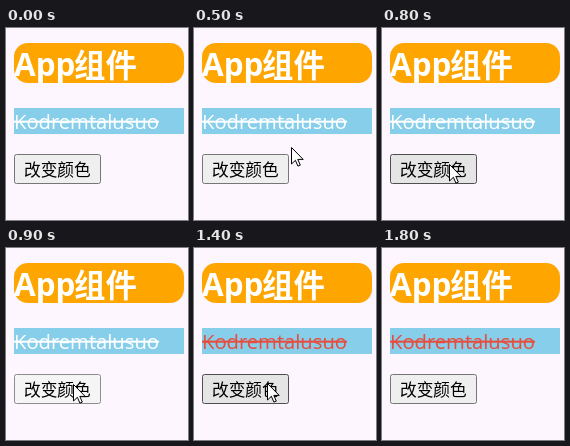
Write an HTML page that moves like this. It is 182 by 192 pixels and loops after 2.2 s.

```html
<!DOCTYPE html>
<html lang="zh-CN">
<head>
<meta charset="utf-8">
<style>
  html, body { margin: 0; width: 100%; height: 100%; overflow: hidden; background: #fdf6ff; }
  svg { display: block; width: 182px; height: 192px; }
  text { font-family: "Open Sans", "Noto Sans CJK SC", "Noto Sans CJK", sans-serif; }
  .title { font-size: 31.4px; font-weight: 700; fill: #fff; }
  .cjk { font-family: "Noto Sans CJK SC", "Noto Sans CJK", sans-serif; }
  #name { font-size: 20.2px; text-decoration: line-through; }
  .label { font-size: 16.7px; }
</style>
</head>
<body>
<svg viewBox="0 0 182 192">
  <rect x="8" y="15" width="170" height="40" rx="14" fill="#ffa500"/>
  <text class="title" x="8" y="48">App</text>
  <text class="title cjk" x="68" y="49">组件</text>
  <rect x="8" y="80" width="170" height="26" fill="#87ceeb"/>
  <text id="name" x="8" y="101">Kodremtalusuo</text>
  <rect id="button" x="8.5" y="126.5" width="86" height="29" rx="2"/>
  <text class="label cjk" x="18" y="148">改变颜色</text>
  <path id="arrow" d="M0 0V16.5L3.9 12.8 6.4 18.6 8.8 17.6 6.3 11.9H11.7Z" fill="#fff" stroke="#000"/>
  <path id="beam" d="M-3 -7.5H-1L0 -6.5 1 -7.5H3M0 -6.5V6.5M-3 7.5H-1L0 6.5 1 7.5H3" fill="none" stroke="#000"/>
</svg>
<script>
  const LOOP = 2200, RED_AT = 1000;
  const looks = {
    idle: ['#efefef', '#767676'],
    hover: ['#e5e5e5', '#4f4f4f'],
    active: ['#f5f5f5', '#8d8d8d']
  };
  // time, pointer shape, x, y, button state
  const steps = [
    [0, '', 0, 0, 'idle'],
    [300, 'beam', 149, 86, 'idle'],
    [400, 'arrow', 125, 107, 'idle'],
    [500, 'arrow', 97, 119, 'idle'],
    [600, 'arrow', 77, 129, 'hover'],
    [700, 'arrow', 70, 134, 'hover'],
    [800, 'arrow', 67, 136, 'hover'],
    [900, 'arrow', 67, 136, 'active'],
    [1000, 'arrow', 67, 136, 'hover'],
    [1400, 'arrow', 73, 135, 'hover'],
    [1500, 'arrow', 97, 122, 'idle'],
    [1600, 'arrow', 130, 112, 'idle'],
    [1700, 'arrow', 172, 82, 'idle'],
    [1800, '', 0, 0, 'idle']
  ];
  const $ = id => document.getElementById(id);
  const name = $('name'), button = $('button');
  const pointers = [$('arrow'), $('beam')];

  function draw(t) {
    const [, shape, x, y, state] = steps.filter(s => s[0] <= t).pop();
    for (const p of pointers) {
      p.style.display = p.id === shape ? 'inline' : 'none';
      p.setAttribute('transform', `translate(${x + 0.5} ${y + 0.5})`);
    }
    const [fill, edge] = looks[state];
    button.setAttribute('fill', fill);
    button.setAttribute('stroke', edge);
    name.setAttribute('fill', t < RED_AT ? '#fff' : '#e74c3c');
  }

  const start = performance.now();
  function tick() {
    draw((performance.now() - start) % LOOP);
    requestAnimationFrame(tick);
  }
  tick();
</script>
</body>
</html>
```
